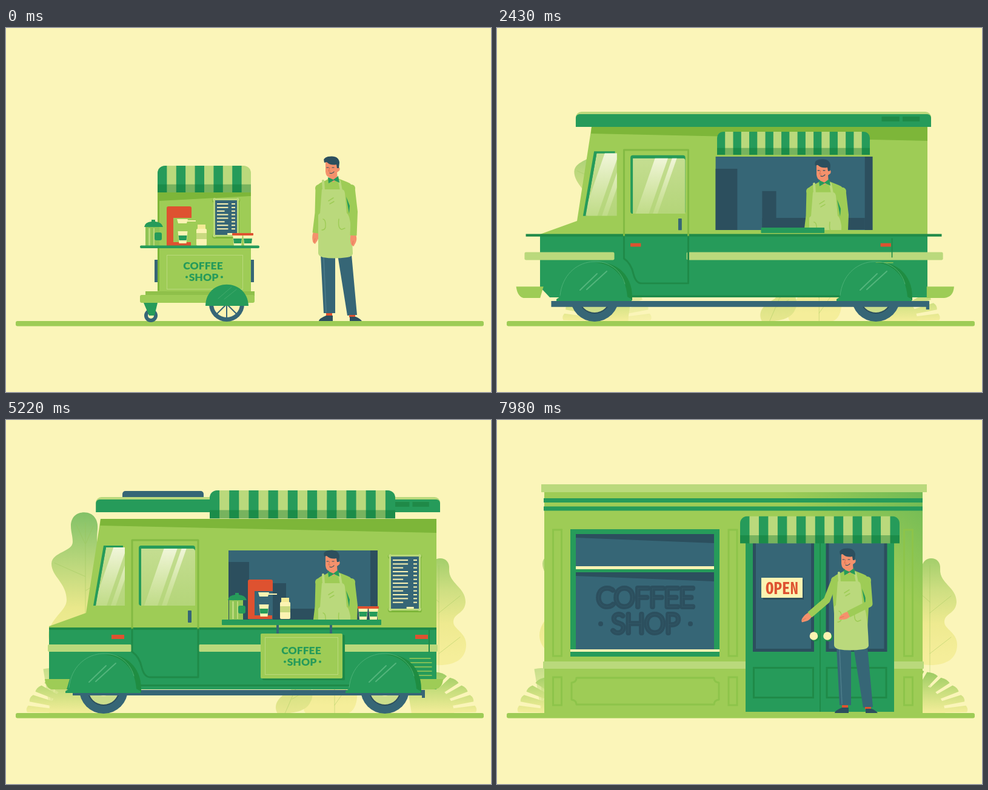
Recreate the animation shown at these times as an HTML page with a canvas. Size 800 by 600 pixels, loop 8000 ms.

```html
<!DOCTYPE html>
<html lang="en">
<head>
<meta charset="utf-8">
<title>Coffee business grows</title>
<style>
html, body { margin: 0; width: 100%; height: 100%; overflow: hidden; background: #fbf5b9; }
canvas { display: block; }
</style>
</head>
<body>
<canvas id="stage" width="800" height="600"></canvas>
<script>
const g = document.getElementById('stage').getContext('2d');
const LOOP = 8000;
const BG = '#fbf5b9', LIME = '#9ecc56', PALE = '#bad97c', OLIVE = '#7db639', GREEN = '#269b5a',
  DEEP = '#1f8a48', NAVY = '#366676', INK = '#2c4f5e', RED = '#de5230', SKIN = '#f4916c', CREAM = '#fcf3b2';

// Smooth interpolation through time/value pairs.
function at(t, ...keys) {
  if (t <= keys[0]) return keys[1];
  for (let i = 2; i < keys.length; i += 2) {
    if (t < keys[i]) {
      const k = (t - keys[i - 2]) / (keys[i] - keys[i - 2]);
      return keys[i - 1] + (keys[i + 1] - keys[i - 1]) * k * k * (3 - 2 * k);
    }
  }
  return keys[keys.length - 1];
}
// Grows from 0 to 1 with a small overshoot.
function pop(t, start, length = 320) {
  const k = Math.min(1, Math.max(0, (t - start) / length)) - 1;
  return k === -1 ? 0 : 1 + 2.7 * k ** 3 + 1.7 * k ** 2;
}
function part(sx, sy, cx, cy, draw) {
  if (sx <= 0 || sy <= 0) return;
  g.save();
  g.translate(cx, cy);
  g.scale(sx, sy);
  g.translate(-cx, -cy);
  draw();
  g.restore();
}
function move(x, y, draw) {
  g.save();
  g.translate(x, y);
  draw();
  g.restore();
}
function box(x, y, w, h, color, r = 0) {
  g.fillStyle = color;
  g.beginPath();
  g.roundRect(x, y, w, h, r);
  g.fill();
}
function frame(x, y, w, h, color, width = 3) {
  g.strokeStyle = color;
  g.lineWidth = width;
  g.strokeRect(x, y, w, h);
}
function dot(x, y, r, color) {
  g.fillStyle = color;
  g.beginPath();
  g.arc(x, y, r, 0, 7);
  g.fill();
}
function fill(color, d) {
  g.fillStyle = color;
  g.fill(new Path2D(d));
}
function line(color, width, d) {
  g.strokeStyle = color;
  g.lineWidth = width;
  g.lineCap = g.lineJoin = 'round';
  g.stroke(new Path2D(d));
}
function fade(y0, y1, ...colors) {
  const f = g.createLinearGradient(0, y0, 0, y1);
  colors.forEach((c, i) => f.addColorStop(i / (colors.length - 1), c));
  return f;
}
function label(text, x, y, font, color) {
  g.font = font;
  g.fillStyle = color;
  g.textAlign = 'center';
  g.textBaseline = 'alphabetic';
  g.fillText(text, x, y);
}
function shopName(x, y) {
  const font = '900 17.5px Lato, sans-serif';
  label('COFFEE', x, y, font, GREEN);
  label('SHOP', x + 1, y + 18.5, font, GREEN);
  dot(x - 27, y + 12.5, 2, GREEN);
  dot(x + 31, y + 12.5, 2, GREEN);
}

// ---- Scenery ----
function cloud(x, circles) {
  g.fillStyle = fade(175, 300, '#fffef4', '#fffdf0', '#fdf3d2', 'rgba(253,240,205,0)');
  g.beginPath();
  for (const [cx, cy, r] of circles) {
    g.moveTo(x + cx + r, cy);
    g.arc(x + cx, cy, r, 0, 7);
  }
  g.fill();
}
function clouds(t) {
  const s = pop(t, 150, 650);
  const drift = at(t, 500, 0, 1080, 0, 2010, 1, 2900, 1);
  g.save();
  g.beginPath();
  g.rect(0, 150, 800, 150);
  g.clip();
  part(s, s, 450, 300, () => {
    cloud(358 + drift * 23, [[0, 222, 50], [-90, 232, 23], [-56, 236, 30], [55, 248, 32], [0, 270, 80]]);
    cloud(478 + drift * 25, [[0, 244, 40], [38, 258, 30], [-30, 262, 30]]);
    cloud(605 - drift * 36, [[0, 279, 32], [32, 283, 29], [53, 294, 24], [-30, 290, 26]]);
  });
  g.restore();
}
function foliage(tones, d, top, bottom, veins) {
  fill(fade(top, bottom, ...tones), d);
  line('rgba(150,195,85,.4)', 1, veins);
}
function bush(x, side, s) {
  if (s <= 0) return;
  g.save();
  g.translate(x, 484);
  g.scale(side * s, s);
  g.fillStyle = fade(-72, 0, '#97c95f', '#c9de7e', '#f5ee9a');
  const spread = a => [Math.cos(a) * 106, -Math.sin(a) * 74];
  for (let i = 0; i < 7; i++) {
    const a = .03 + i * .24, [x0, y0] = spread(a), [x1, y1] = spread(a + .15 + i * .01);
    g.beginPath();
    g.moveTo(0, 0);
    g.lineTo(x0, y0);
    g.quadraticCurveTo((x0 + x1) * .52, (y0 + y1) * .52, x1, y1);
    g.lineTo(0, 0);
    g.fill();
  }
  g.beginPath();
  g.ellipse(0, 0, 70, 56, 0, Math.PI * 1.5, Math.PI * 2);
  g.lineTo(0, 0);
  g.fill();
  g.restore();
}
function scenery(t) {
  clouds(t);
  const tall = at(t, 80, 0, 700, .9, 1080, 1, 1500, 1.018);
  move(at(t, 1080, 0, 2010, -3, 2750, -97, 2910, -103, 4100, -112), 0, () =>
    part(at(t, 80, 0, 700, 1), tall, 241, 484, () => foliage(['#82c167', '#b7d67b', '#e9e88b', '#f5ee9a'],
      'M241 158C256 158 265 170 263 186C261 206 262 222 275 238C296 258 300 285 284 300C276 310 290 330 292 355C290 385 262 397 241 397C210 397 182 382 182 357C183 330 212 318 212 300C212 272 187 262 187 241C188 222 222 222 222 206C222 196 219 190 219 180C219 166 228 158 241 158Z',
      158, 390, 'M243 175V483M243 210L228 178M243 210L256 180M243 262L192 240M243 285L282 262M243 365L192 340M243 370L285 345')));
  const mid = at(t, 150, 0, 800, 1);
  move(at(t, 2050, 0, 2950, 190, 3750, 264), 0, () =>
    part(mid, mid, 450, 484, () => foliage(['#a3ce6b', '#cfdf82', '#eeea90', '#f5ee9a'],
      'M452 228C462 228 468 235 467 246C466 270 494 275 494 300C493 320 474 318 474 333C474 345 495 350 495 370C495 395 475 404 451 404C425 404 411 392 411 372C411 348 434 340 432 322C430 305 416 305 417 286C418 268 440 268 438 256C435 245 436 229 452 228Z',
      228, 390, 'M450 240V483M450 300L425 278M450 318L485 290M450 385L485 358')));
  const low = at(t, 250, 0, 850, 1);
  move(at(t, 2050, 0, 2850, 20), 0, () => part(low, low, 490, 484, () => {
    foliage(['#bfd97a', '#e2e58a', '#f5ee9a'],
      'M520 365C545 365 535 400 550 420C565 440 562 484 540 484H475C460 470 495 450 488 425C484 400 505 395 510 375Z',
      365, 470, 'M522 385V483M522 445L495 405M522 470L550 430');
    foliage(['#cbe083', '#d9e284', '#efea94'],
      'M470 404C484 404 491 418 484 430C476 440 492 450 482 465C476 480 455 484 428 484C419 468 432 455 446 448C460 440 445 430 455 415Q460 405 470 404Z',
      404, 500, 'M471 410Q455 450 440 484M458 445L450 430M452 460L472 448');
  }));
  const grow = pop(t, 50, 600), left = at(t, 2050, 0, 2850, -139);
  g.globalAlpha = .5;
  bush(212 + left, 1, grow);
  g.globalAlpha = 1;
  bush(280 + left, -1, grow);
  bush(584 + at(t, 2050, 0, 2850, 85), 1, grow);
}

// ---- Shared props ----
function awning(x, y, w, h, n) {
  g.save();
  g.beginPath();
  g.roundRect(x, y, w, h, [12, 12, 0, 0]);
  g.clip();
  for (let i = 0; i < n; i++) box(x + i * w / n, y, w / n + .5, h, i % 2 ? PALE : GREEN);
  box(x, y + h * .7, w, h * .3, 'rgba(10,115,45,.38)');
  g.restore();
}
function menu(x, y, w, h) {
  const corners = [[x + 3, y + 3], [x + w - 3, y + 3], [x + 3, y + h - 3], [x + w - 3, y + h - 3]];
  corners.forEach(([cx, cy]) => dot(cx, cy + 1, 4, OLIVE));
  box(x + 3, y + 2, w - 3, h, OLIVE);
  corners.forEach(([cx, cy]) => dot(cx, cy, 3, PALE));
  box(x + 1, y + 1, w - 2, h - 2, PALE);
  box(x + 4, y + 4, w - 8, h - 8, NAVY);
  const rows = Math.round(h / 7.8), step = (h - 18) / rows;
  for (let i = 0; i < rows; i++) {
    const ly = y + 9 + i * step;
    box(x + 7, ly, (w - 16) * (i % 3 === 2 ? .45 : .66), 2, CREAM);
    box(x + w - 13, ly, 6, 2, CREAM);
  }
  box(x + w * .55, y + h - 7, 12, 3, CREAM);
}
function cup(x, y, lid) {
  fill(CREAM, `M${x} ${y}h16l-2 20h-12z`);
  fill(GREEN, `M${x + 1} ${y + 7}h14l-1 8h-12z`);
  if (lid) box(x - 1, y - 2, 18, 4, RED, 1);
}
function kit(machineX, cupsX) {
  box(230, 327, 23, 33, '#8fc455');
  box(235, 330, 3, 29, PALE);
  box(243, 330, 2, 29, PALE);
  fill(GREEN, 'M228 328Q229 320 240 319V316H246V319Q257 320 259 328Z');
  box(245, 337, 12, 13, GREEN, 3);
  move(machineX - 265, 0, () => {
    fill(RED, 'M265 297Q265 294 268 294H303Q306 294 306 297V313H276V353H305V359H265Z');
    fill(CREAM, 'M282 315H300L298 322H284Z');
    box(298, 317, 15, 2, CREAM);
    cup(283.5, 335, false);
  });
  box(316, 324, 13, 8, '#f3ea95');
  box(314, 331, 17, 28, CREAM, 2);
  box(314, 338, 17, 10, '#c9d97f');
  cup(cupsX, 340, true);
  cup(cupsX + 17, 340, true);
}

// ---- Cart ----
function cart() {
  box(245, 382, 6, 37, NAVY);
  box(403, 382, 6, 37, NAVY);
  box(250, 268, 154, 168, LIME);
  fill(OLIVE, 'M253 271H404V277L253 285Z');
  box(250, 271, 3, 162, OLIVE);
  frame(265.5, 374.5, 125, 56, PALE, 1);
  menu(341, 280, 44, 65);
  kit(265, 374);
  box(221, 358.5, 197, 4.5, GREEN, 2);
  box(230, 434, 180, 8, '#8fc04a');
  box(221, 440, 189, 13, LIME, 3);
  shopName(325, 398);
  dot(239, 474, 11, NAVY);
  dot(239, 474, 5, CREAM);
  fill(GREEN, 'M227 453H250L245 474H236Z');
  dot(364, 455, 29, NAVY);
  dot(364, 455, 22, CREAM);
  for (let i = 0; i < 4; i++) {
    const a = i * Math.PI / 4, c = Math.cos(a) * 22, s = Math.sin(a) * 22;
    line(NAVY, 2, `M${364 - c} ${455 - s}L${364 + c} ${455 + s}`);
  }
  fill(GREEN, 'M329 458C330 411 398 411 400 458Z');
  line('#43ab6d', 1, 'M350 446L372 427M360 447L380 431');
  awning(250, 227, 154, 44, 10);
}

// ---- Van ----
function glass(d, x) {
  const shape = new Path2D(d);
  g.save();
  g.clip(shape);
  g.fillStyle = fade(208, 306, '#c5de92', '#b4d579');
  g.fill(shape);
  const shine = fade(208, 306, 'rgba(245,248,225,.95)', 'rgba(225,237,180,.25)');
  fill(shine, `M${x} 208h22l-34 98h-22z`);
  fill(shine, `M${x + 29} 208h8l-34 98h-8z`);
  g.restore();
}
function wheel(x, s) {
  part(s, s, x, 444, () => {
    dot(x, 444, 40, NAVY);
    dot(x, 444, 27, INK);
    dot(x, 444, 25, '#cadd8c');
    dot(x, 444, 11, CREAM);
  });
}
function arch(x, tilt) {
  g.save();
  g.translate(x, 447);
  g.rotate(tilt);
  fill('#1f8d42', 'M-50 0C-50 -78 62 -82 62 -3L62 2Z');
  fill(GREEN, 'M-63 0L-57 -4C-50 -80 50 -78 54 -4L61 0V3H-63Z');
  line('#4cb176', 1, 'M-57 -6C-50 -74 35 -80 50 -25');
  line('#53b57c', 2, 'M-24 -15L4 -42M-13 -16L20 -46');
  g.restore();
}
function vanBody() {
  fill(LIME, 'M156 163H710V345H71V340L132 318Z');
  fill(OLIVE, 'M156 163H710V186L155 174Z');
  fill(GREEN, 'M71 343H710V444H87L71 427Z');
}
function vanDetails(t) {
  const show = (start, cx, cy, draw) => { const s = pop(t, start); part(s, s, cx, cy, draw); };
  show(2200, 390, 376, () => {
    box(71, 342, 639, 4, DEEP);
    box(69, 370, 138, 12, PALE, 2);
    box(318, 370, 394, 12, PALE, 2);
    box(218, 436, 348, 3, DEEP);
    box(110, 445, 580, 9, NAVY);
    box(686, 445, 5, 13, NAVY);
  });
  show(2250, 390, 435, () => {
    fill(LIME, 'M64 427H105L100 444H75Q66 442 64 427ZM680 427H721Q720 443 706 444H680Z');
  });
  const lamps = pop(t, 2500) * at(t, 4150, 1, 4450, 0);
  part(lamps, lamps, 390, 405, () => {
    box(64, 390, 7, 29, RED);
    box(709, 390, 7, 29, RED);
  });
  show(2350, 435, 358, () => {
    box(174, 354, 21, 7, RED);
    box(675, 354, 21, 7, RED);
    line(LIME, 1.5, 'M666 393H700M666 400H702M666 407H702M666 414H702M666 421H702');
    line(DEEP, 2, 'M698 345V382');
  });
  show(2280, 172, 256, () => {
    fill(GREEN, 'M161 207H193V210L150 306H144Z');
    glass('M165 210H196V306H148Z', 178);
  });
  show(2320, 262, 310, () => {
    line('#83ba43', 3, 'M208 345V198H317V345');
    line(DEEP, 3, 'M208 345V382Q220 390 224 408Q228 424 238 424H317V345');
    box(219, 207, 93, 99, GREEN, 4);
    glass('M223 212H308Q312 212 312 216V306H223Z', 262);
    box(300, 314, 6, 20, NAVY, 1);
  });
  const shadow = at(t, 2750, 0, 2850, 1, 3050, 1, 3300, 0);
  if (shadow) box(316, 197, 2, 228, `rgba(15,80,50,${shadow})`);
  const board = pop(t, 2550);
  move(at(t, 2910, 4, 3200, 0), 0, () => part(board, board, 658, 268, () => menu(631, 221, 54, 94)));
  show(2180, 490, 272, () => {
    box(367, 215, 246, 115, NAVY);
    box(601, 215, 12, 115, INK);
    box(367, 234, 34, 96, INK);
    box(440, 269, 22, 60, INK);
    box(440, 311, 161, 18, INK);
  });
  show(2480, 490, 329, () => move(138, -31, () => kit(261, 443)));
}
function vanRoof(t) {
  const lift = at(t, 4980, 0, 5220, -11, 5400, -14);
  const fix = pop(t, 2500);
  move(0, lift, () => {
    const wide = pop(t, 2280, 360);
    part(fix, fix, 262, 138, () =>
      box(at(t, 2910, 185, 3300, 192), 128, at(t, 2910, 146, 3300, 134), 14, NAVY, [5, 5, 0, 0]));
    const chimney = pop(t, 2620) * at(t, 4350, 1, 4550, 0);
    g.save();
    g.translate(204, 132 + at(t, 4050, 0, 4300, -27, 4550, 6));
    g.rotate(-.42);
    part(chimney, chimney, 0, 0, () => {
      box(-15, -11, 34, 15, NAVY, 3);
      fill(RED, 'M-15 -30H15L10 -20L13 -10H-11L-8 -20Z');
      box(-17, -34, 34, 4, NAVY, 1);
    });
    g.restore();
    const hatch = pop(t, 2600) * at(t, 4250, 1, 4500, 0);
    part(hatch, hatch, 472, 138, () => {
      fill(PALE, 'M472 137L554 126L555 130L500 138Z');
      fill(GREEN, 'M490 138L555 128V132L515 138Z');
    });
    part(wide * at(t, 4980, 1, 5220, 1.012), Math.min(wide, 1), 716, 163, () => {
      box(155, 138, 561, 25, PALE, [9, 9, 0, 0]);
      box(155, 142, 561, 21, GREEN, [6, 6, 0, 0]);
      box(638, 146, 28, 8, DEEP);
      box(671, 146, 27, 8, DEEP);
    });
  });
}
function vanFront(t) {
  const counter = pop(t, 2400), sign = pop(t, 2580);
  part(counter, 1, 488, 333, () => box(356, 329, 263, 9, GREEN, 1));
  part(1, sign, 488, 338, () => {
    box(446, 338, 4, 14, NAVY);
    box(534, 338, 4, 14, NAVY);
    box(423, 354, 136, 75, DEEP, 2);
    box(420, 352, 135, 74, LIME, 2);
    frame(427.5, 358.5, 120, 61, PALE, 1);
    shopName(487, 386);
  });
}
function inVan(t, draw) {
  part(at(t, 5290, 1, 5480, 1.06), at(t, 5290, 1, 5480, .3), 390, 484, draw);
}
function van(t) {
  inVan(t, () => {
    const rolled = pop(t, 1600, 250);
    wheel(161, rolled);
    wheel(625, rolled);
    move(at(t, 1480, -70, 1640, 0), 0, () =>
      part(at(t, 1480, .45, 1640, 1.1, 1850, 1.08, 2010, 1.063, 2230, .975, 2400, 1),
        at(t, 1480, .4, 1640, .32, 1850, .42, 2010, .555, 2230, 1.05, 2400, 1), 390.5, 444, vanBody));
    vanDetails(t);
    const tilt = at(t, 1700, .05, 2010, .035, 2300, 0);
    part(rolled, rolled, 161, 444, () => arch(161, tilt));
    part(rolled, rolled, 625, 444, () => arch(623, tilt));
    vanRoof(t);
  });
}

// ---- Shop ----
function shop(t) {
  part(at(t, 5480, .8, 5640, 1.064, 5720, 1.064, 5900, .985, 6050, 1), at(t, 5480, .3, 5700, .6, 5920, 1, 6150, .992, 6400, 1), 390, 484, () => {
    const wall = g.createLinearGradient(540, 330, 702, 130);
    wall.addColorStop(0, LIME);
    wall.addColorStop(.45, LIME);
    wall.addColorStop(1, '#72bb55');
    box(78, 118, 624, 366, wall);
    box(77, 129, 625, 7, GREEN);
    box(77, 142.5, 625, 7, GREEN);
    box(73, 106, 636, 13, PALE);
  });
  const s = pop(t, 5700), trim = '#8dc44a';
  part(1, s, 390, 484, () => {
    for (const x of [92.5, 382, 671.5]) {
      frame(x, 181, 14, 208, trim);
      frame(x, 424, 14, 46, trim);
    }
    box(76, 398, 628, 12, PALE, 1);
    line(trim, 3, 'M131 425H358Q358 432 366 433V461Q358 462 358 469H131Q131 462 123 461V433Q131 432 131 425Z');
  });
  const w = pop(t, 5740, 300);
  part(w, w, 244, 285, () => {
    box(121, 180, 246, 210, GREEN);
    box(130, 188, 228, 190, NAVY);
    fill(INK, 'M130 188H358V203L130 194ZM130 251H358V266L130 257Z');
    box(130, 241, 228, 5, CREAM);
    box(130, 246, 228, 5, GREEN);
    box(121, 378, 246, 4, CREAM);
    g.lineJoin = 'round';
    g.lineWidth = 8;
    g.strokeStyle = INK;
    g.textAlign = 'center';
    for (const [word, y] of [['COFFEE', 308], ['SHOP', 351]]) {
      g.font = '100 43px Lato, sans-serif';
      g.strokeText(word, 245, y);
      label(word, 245, y, g.font, '#365f6d');
    }
    dot(171, 336, 4, INK);
    dot(319, 336, 4, INK);
  });
  const d = pop(t, 5780, 300);
  part(d, d, 533, 481, () => {
    box(410, 180, 245, 301, GREEN);
    box(532, 180, 2, 301, DEEP);
    for (const x of [422, 542.5]) {
      box(x, 193, 101, 189, INK);
      box(x + 5, 198, 91, 179, NAVY);
      frame(x + 1.5, 408.5, 98, 49, DEEP);
    }
    for (const x of [522.5, 545]) {
      dot(x + 2, 358, 7, DEEP);
      dot(x, 356, 6.8, CREAM);
    }
  });
  const open = pop(t, 6650);
  g.save();
  g.translate(470, 260);
  g.rotate(.12 * Math.sin((t - 6650) / 110) * at(t, 6650, 1, 7400, 0));
  part(open, open, 0, 0, () => {
    box(-31, 3, 67, 33, INK);
    box(-34, 0, 68, 33, CREAM);
    label('OPEN', 0, 27, 'bold 27px "Noto Sans Mono CJK JP", "Noto Sans Mono", monospace', RED);
  });
  g.restore();
}

// ---- Barista ----
function arm(sx, sy, ex, ey, hx, hy) {
  const a = Math.atan2(hy - ey, hx - ex);
  g.save();
  g.translate(hx, hy);
  g.rotate(a);
  fill(SKIN, 'M-2 -4Q6 -7 12 -4L18 -1Q17 3 12 4Q5 6 -2 4Z');
  line('#e47b58', 1, 'M9 0L15 1');
  g.restore();
  g.lineCap = 'butt';
  g.lineJoin = 'round';
  g.strokeStyle = LIME;
  g.lineWidth = 11;
  g.stroke(new Path2D(`M${sx} ${sy}L${ex} ${ey}L${hx} ${hy}`));
  dot(sx, sy, 6, LIME);
}
function barista(t) {
  fill(NAVY, 'M519 374H543L543 470H524ZM547 374H570L579 473L563 474Z');
  line('#4d7d8b', 1.5, 'M524 378L528 468');
  box(528, 470, 10, 5, RED);
  box(566, 473, 10, 4, RED);
  fill(INK, 'M516 483Q516 479 528 474H539V483ZM567 483V476H577Q584 479 587 483Z');
  const pose = (rest, offer, serve, greet) => at(t, 200, rest, 800, offer, 1400, offer, 2010, rest + (offer - rest) * .13,
    2300, rest, 2550, rest, 2850, serve, 3500, serve, 4000, rest, 6750, rest, 7250, greet);
  arm(516, 264, pose(515, 499, 496, 503), pose(305, 297, 290, 297), pose(511, 474, 458, 475), pose(338, 313, 276, 321));
  fill(LIME, 'M533 248L548 248L563 254Q573 257 574 270L570 345H517L511 268Q511 257 524 253Z');
  fill(PALE, 'M521 266H554Q558 266 559 272L562 305Q570 309 572 372Q571 377 563 378Q540 381 523 378Q515 376 515 371L515 308L518 305Z');
  line(PALE, 4, 'M523 252L524 268M550 252L553 268');
  line(LIME, 1.5, 'M523 315Q528 316 527 328Q526 333 521 333M549 315Q547 331 554 332L559 330');
  line(LIME, 1.5, 'M532 285L540 280M534 290L541 286');
  fill(GREEN, 'M561 278L567 293L566 306Z');
  arm(570, 264, at(t, 6800, 574.5, 7250, 573), 303, at(t, 6800, 573, 7250, 539), at(t, 6800, 342, 7250, 320));
  fill(SKIN, 'M527 221H548V229Q552 230 550 235L546 238L547 250L539 254L533 248V246Q528 245 527 237Z');
  fill(GREEN, 'M531 246L540 250L548 244L550 255L541 251L532 256Z');
  fill(INK, 'M525 222Q522 214 531 212Q549 209 550 222L549 231H546L545 225Q535 227 529 221Z');
  line(INK, 1.2, 'M529 230H532M538 230H541M534 239Q538 241 541 237');
  line('#d96e4d', 1, 'M534 230L532 236L535 236');
}

function draw(t) {
  box(0, 0, 800, 600, BG);
  scenery(t);
  box(16, 483, 772, 8.5, LIME, 3);
  if (t < 1480) {
    move(0, at(t, 1130, 0, 1330, -104, 1470, 0), () =>
      part(at(t, 1330, 1, 1480, 1.6), at(t, 700, 1, 1080, 1.008, 1330, 1, 1480, .35), 320, 484, cart));
  } else if (t < 5480) van(t);
  else shop(t);

  g.save();
  g.beginPath();
  g.rect(0, 0, 800, at(t, 2250, 486, 2450, 329, 5290, 329, 5480, 486));
  g.clip();
  const inside = at(t, 2250, 0, 2450, 5, 2910, 5, 3200, 3, 5290, 3, 5480, 0);
  move(at(t, 5400, 0, 5850, 41), inside, () => barista(t));
  g.restore();

  if (t >= 1480 && t < 5480) inVan(t, () => vanFront(t));
  if (t > 2350) {
    const shrink = at(t, 5400, 0, 5800, 1);
    const open = pop(t, 2350);
    part(open, open, 489, 171, () => awning(336 + 65 * shrink,
      at(t, 4950, 171, 5220, 116, 5400, 100, 5650, 130, 6020, 270, 6150, 243, 6400, 150, 6600, 158.5),
      306 - 43 * shrink, at(t, 5220, 46.5, 5800, 50, 6150, 61, 6400, 42, 6600, 45), t < 5600 ? 19 : 17));
  }
}
function tick() {
  draw(performance.now() % LOOP);
  requestAnimationFrame(tick);
}
tick();
</script>
</body>
</html>
```
